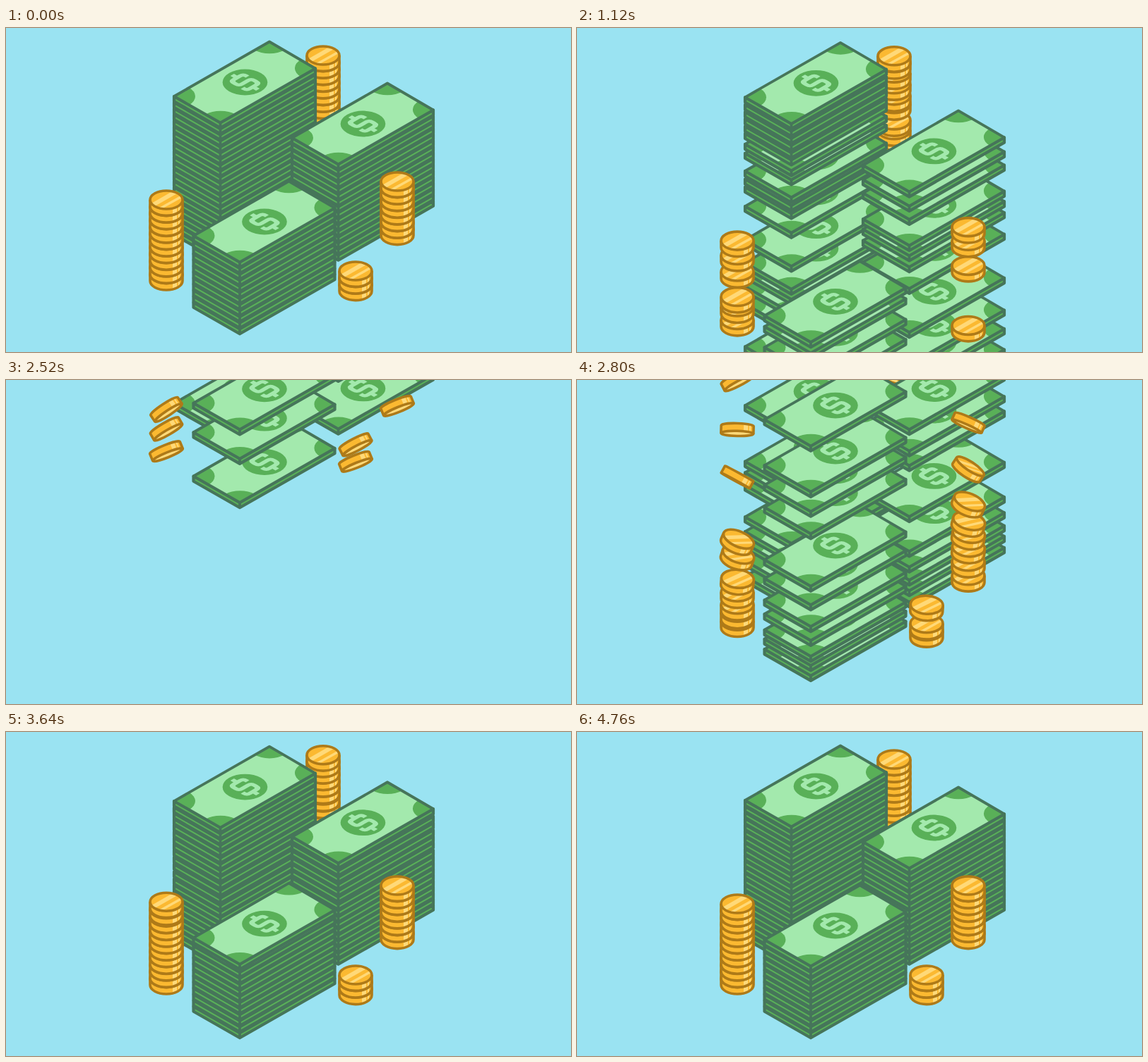
Recreate the animation shown at these times as an HTML page. Size 800 by 460 pixels, loop 4830 ms.

```html
<!DOCTYPE html>
<html lang="en">
<head>
<meta charset="utf-8">
<title>Money stacks</title>
<style>
  html, body { margin: 0; width: 100%; height: 100%; overflow: hidden; background: #9ae3f2; }
  svg { display: block; width: 800px; height: 460px; }
</style>
</head>
<body>
<svg viewBox="0 0 800 460">
  <defs>
    <clipPath id="note"><rect width="156" height="76"/></clipPath>
    <clipPath id="disc"><ellipse rx="23" ry="13"/></clipPath>
    <!-- Origin at the left corner of the top face -->
    <g id="bill" stroke-linejoin="round">
      <path d="M0 0L65.5 37.5L200 -39.5V-32.3L65.5 44.7L0 7.2Z" fill="#59b058" stroke="#46755a" stroke-width="4.2"/>
      <g transform="matrix(.866 -.5 .866 .5 0 0)">
        <rect width="156" height="76" fill="#a3e9ad"/>
        <g clip-path="url(#note)" fill="#59b058">
          <circle r="24.5"/><circle cx="156" r="24.5"/>
          <circle cy="76" r="24.5"/><circle cx="156" cy="76" r="24.5"/>
        </g>
        <circle cx="78" cy="38" r="26" fill="#59b058"/>
        <path transform="translate(78 38)" fill="none" stroke="#a3e9ad" stroke-width="6"
          d="M10 -6V-8Q10 -13 5 -13H-5Q-10 -13 -10 -8V-5Q-10 0 -5 0H5Q10 0 10 5V8Q10 13 5 13H-5Q-10 13 -10 8V6M0 -21V-13M0 13V21"/>
      </g>
      <path d="M0 0L135 -77.5L200 -39.5L65.5 37.5ZM65.5 37.5V45" fill="none" stroke="#46755a" stroke-width="3.8"/>
    </g>
    <g id="shine" clip-path="url(#disc)" stroke="#ffd978">
      <path d="M-24 10L18 -14" stroke-width="6"/>
      <path d="M-12 14L24 -6" stroke-width="3.5"/>
    </g>
  </defs>
  <g id="scene"></g>
</svg>
<script>
const LOOP = 4830, STEP = 70, RETURN = 1890;
const DROP_START = 613, LAND_START = 2925, LAND_STAGGER = 32;
const FALL = 3.81e-6;
const scene = document.getElementById('scene');

// Back to front; x, y: top piece at rest; leave: when the top piece starts to drop
const stacks = [
  { draw: coin, x: 449, y: 39, count: 20, leave: 1060 },
  { draw: bill, x: 238, y: 97, count: 23, leave: 1050 },
  { draw: bill, x: 405, y: 156, count: 16, leave: 903 },
  { draw: coin, x: 227, y: 244, count: 12, leave: 872 },
  { draw: coin, x: 554, y: 218, count: 8, leave: 863 },
  { draw: bill, x: 265.5, y: 295, count: 12, leave: 810 },
  { draw: coin, x: 495, y: 345, count: 3, leave: 740 },
];

function randomizer(seed) {
  return () => {
    seed = (seed * 16807) % 2147483647;
    return seed / 2147483647;
  };
}

// Rising fractions from 0 to 1 with uneven gaps
function unevenSteps(count, seed) {
  const random = randomizer(seed * 7919 + 101);
  random();
  const steps = [0];
  while (steps.length < count) steps.push(steps.at(-1) + 0.25 + 2.25 * random() ** 2);
  return steps.map(s => s / steps.at(-1));
}

stacks.forEach((stack, i) => {
  const { count, leave } = stack;
  stack.pitch = stack.draw === bill ? 8.6 : 9.6;
  stack.drops = unevenSteps(count, i + 1).map(f => DROP_START + f * (leave - DROP_START));
  stack.lands = unevenSteps(count, i + 20).map(f => LAND_START + f * LAND_STAGGER * (count - 1));
});

function dropOffset(age) {
  return age > 0 ? FALL * age ** 3 : 0;
}

// Slowing fall, a slight dip, then one small rebound
function landOffset(age) {
  if (age < 0) return FALL * age ** 3;
  if (age < 60) return 2 * Math.sin(Math.PI * age / 60);
  if (age < 430) return -8 * Math.sin(Math.PI * ((age - 60) / 370) ** 0.6);
  return 0;
}

function bill(x, y) {
  return `<use href="#bill" x="${x}" y="${y.toFixed(2)}"/>`;
}

function coin(x, y, offset) {
  const lift = Math.max(0, -offset - 20);
  const facing = Math.cos(Math.min(1.85, lift * 0.0125));
  const tilt = 34 * Math.sin(Math.PI * lift / 190);
  const side = facing < 0 ? -1 : 1;
  const ry = 13 * Math.abs(facing);
  const depth = 9.4 + 2 * (1 - Math.abs(facing));
  const face = -side * depth / 2, back = -face;
  const rim = px => side * ry * Math.sqrt(1 - (px / 23) ** 2);
  const strip = (a, b) =>
    `<path d="M${a} ${face + rim(a)}V${back + rim(a)}L${b} ${back + rim(b)}V${face + rim(b)}Z" fill="#ffd978"/>`;
  const body = `M-23 ${face}V${back}A23 ${ry} 0 0 ${side > 0 ? 0 : 1} 23 ${back}V${face}`;
  const outline = 'stroke="#ae7a18" stroke-width="3.6"';
  const shine = side > 0
    ? `<use href="#shine" transform="translate(0 ${face}) scale(1 ${Math.max(facing, 0.01)})"/>` : '';
  return `<g transform="translate(${x} ${y + 4.7}) rotate(${tilt})">
    <path d="${body}" fill="#fbb931"/>${strip(9, 15)}${strip(17, 19)}
    <path d="${body}" fill="none" ${outline}/>
    <ellipse cy="${face}" rx="23" ry="${ry}" fill="${side > 0 ? '#fbb931' : '#ffd978'}"/>${shine}
    <ellipse cy="${face}" rx="23" ry="${ry}" fill="none" ${outline}/></g>`;
}

function render(time) {
  let markup = '';
  for (const { draw, x, y, count, pitch, drops, lands } of stacks) {
    for (let k = 0; k < count; k++) {
      const offset = time < RETURN ? dropOffset(time - drops[k]) : landOffset(time - lands[k]);
      const top = y + pitch * (count - 1 - k) + offset;
      if (top > -60 && top < 540) markup += draw(x, top, offset);
    }
  }
  scene.innerHTML = markup;
}

const start = performance.now();
let shown = -1;
function tick() {
  const time = Math.floor(((performance.now() - start) % LOOP) / STEP) * STEP;
  if (time !== shown) render(shown = time);
  requestAnimationFrame(tick);
}
tick();
</script>
</body>
</html>
```
